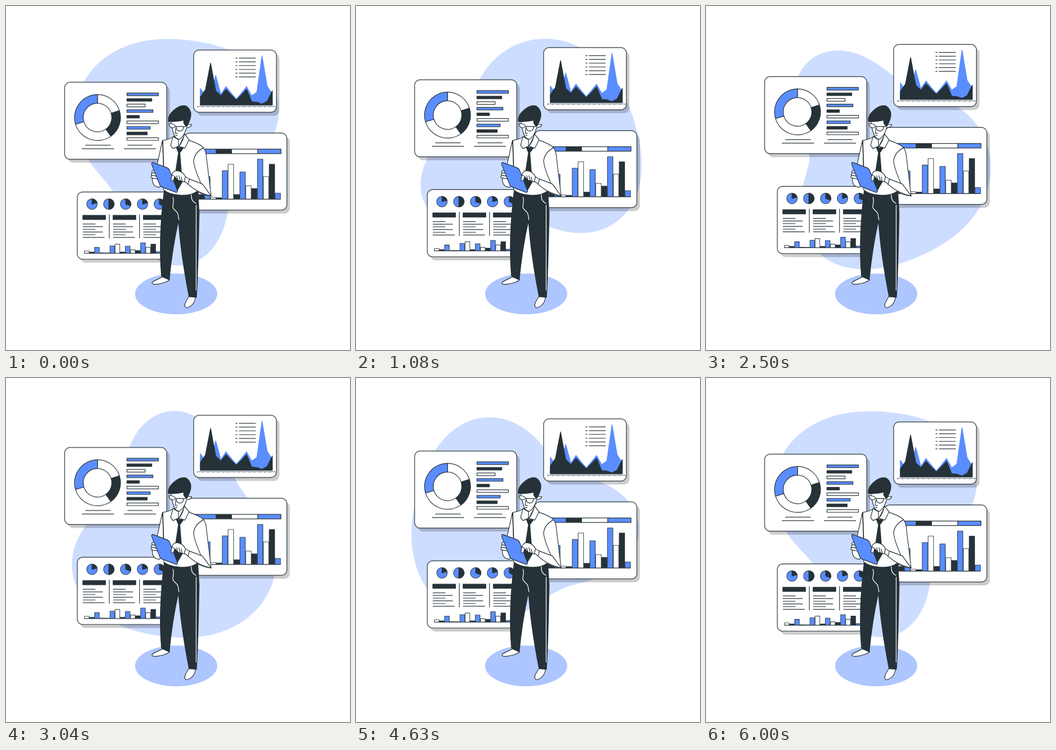
Animation, 748 px wide and 748 px high, one loop 6040 ms. Source, as an HTML page:

```html
<!DOCTYPE html>
<html lang="en">
<head>
<meta charset="utf-8">
<title>Data analysis</title>
<style>
  html, body { margin: 0; width: 100%; height: 100%; overflow: hidden; background: #fff; }
  svg { display: block; width: 100vw; height: 100vh; }
  #blob { fill: #cdddff; transform-origin: 369px 318px; animation: spin 6040ms linear infinite; }
  #cards { animation: float 6040ms linear infinite; }
  @keyframes spin { to { transform: rotate(360deg); } }
  @keyframes float {
    from, to { transform: translateY(.2px); }
    50% { transform: translateY(-14.6px); }
  }
  .ink { stroke: #263238; stroke-width: 1.4; stroke-linejoin: round; stroke-linecap: round; }
  .thin { stroke-width: 1.1; }
  .blue { fill: #5a8dff; }
  .dark { fill: #263238; }
  .white { fill: #fff; }
  .line { fill: none; }
  .chalk { fill: none; stroke: #fff; stroke-width: 1.5; }
  .shadow { opacity: .2; }
</style>
</head>
<body>
<svg viewBox="0 0 748 748">
  <path id="blob"/>
  <ellipse cx="370" cy="626" rx="89.3" ry="44.3" fill="#adc6ff"/>
  <g id="cards"></g>

  <g class="ink">
    <!-- shoes and trousers -->
    <path class="white" d="M340 589L356 595Q348 603 324 605.5C315 604 316 601 322 598Z"/>
    <path class="white" d="M398 631L412 633Q410 651 394 656C387 656 388 649 391 643Z"/>
    <path class="dark" d="M344 401Q331 505 338 587L355 595.5Q361 530 375 467Q380 540 398 632L414 633.5Q417 600 420 450L417 403Z"/>
    <path class="chalk" d="M363 416C367 428 361 432 363 438S373 447 374 453L376 465M403 410Q402 424 413 429M413.5 433V618"/>

    <!-- shirt, collar and tie -->
    <path class="white" d="M340 293L329 343L318 377Q319 394 334 394L345 380Z"/>
    <path class="white" d="M341 292Q354 291 364 284L386 279L398 292C430 303 434 308 436 330L446 413Q430 412 415 403C397 417 358 412 343 400Z"/>
    <path class="line" d="M341 293L343 351M430 308Q410 318 408 337Q409 352 424 386"/>
    <path class="white" d="M366 282L375 307L389 279Z"/>
    <path class="dark" d="M369 304L376 308L386 308L378 319L383 383L372 402L364 392L375 319Z"/>
    <path class="white" d="M363 284L358 303L363 310L375 305V291ZM388 278L398 291L389 309L376 305Q385 295 388 278Z"/>

    <!-- head -->
    <path class="white" d="M359 246Q358 257 364 276Q367 289 377 290Q388 283 393 264Q402 265 404 258Q396 256 393 260V240Z"/>
    <path class="dark" d="M353 251Q351 237 368 224Q380 214 392 217.5Q411 231 394 260L392 262L388 257Q385 254 387 248Q371 252 353 251Z"/>
    <path class="white" d="M354 256Q366 255 369 262Q358 270 354 256ZM370 262H386Q386 272 378 272T370 262Z"/>
    <path class="line" d="M386 263L394 261M369 266L368 277H373M369 282L372 281"/>

    <!-- hands and tablet -->
    <g id="fingers" class="white" transform="rotate(10 318 358)"></g>
    <path class="blue" d="M319 340L351 352Q355 354 356 358L373 402Q373 406 369 405L340 394Q335 392 334 388L317 345Q316 340 319 340Z"/>
    <path class="white" d="M398 376L427 387L446 413Q414 406 391 383L374 379L367 371L364 379Q359 383 359 376L361 367Q363 358 372 358Q385 360 390 371Z"/>
    <path class="line" d="M361 367L367 371M371 369L374 379M376 369L379 380M381 372L383 381M390 371L388 382M399 376L396 387"/>
  </g>
</svg>

<script>
const tones = ['white', 'dark', 'blue'];
const repeat = (n, draw) => Array.from({ length: n }, (_, i) => draw(i)).join('');

const box = (x, y, w, h, tone, extra = '') =>
  `<rect class="ink ${tone}" x="${x}" y="${y}" width="${w}" height="${h}" ${extra}/>`;
const path = (d, tone) => `<path class="ink ${tone}" d="${d}"/>`;
const line = (x1, x2, y) => path(`M${x1} ${y}H${x2}`, 'line');
const card = (x, y, w, h) =>
  box(x + 6.5, y + 7.5, w, h, 'dark shadow', 'rx="12" style="fill:#000;stroke:none"') +
  box(x, y, w, h, 'white', 'rx="12"');

const polar = (cx, cy, r, deg) => {
  const a = deg * Math.PI / 180;
  return [cx + r * Math.cos(a), cy + r * Math.sin(a)];
};

// Pie slice, or a ring slice when an inner radius is given.
function slice(cx, cy, r, from, to, tone, inner = 0) {
  return path(`M${polar(cx, cy, r, from)}A${r} ${r} 0 0 1 ${polar(cx, cy, r, to)}` +
    `L${polar(cx, cy, inner, to)}` +
    `A${inner} ${inner} 0 0 0 ${polar(cx, cy, inner, from)}Z`, tone);
}

// Both column charts show the same data at different scales.
const sales = [19, 10, 49, 4, 3, 62, 76, 10, 59, 29, 23, 87, 49, 76, 13];
const columns = (x, base, pitch, scale) =>
  sales.map((v, i) => box(x + i * pitch, base - v * scale, pitch - .9, v * scale, tones[i % 3] + ' thin')).join('') +
  line(x, x + pitch * sales.length - 1, base);

// Peaks are heights at even steps above the base line.
function area(peaks, tone) {
  const pts = peaks.map((h, i) => `${422.5 + i * 11.18},${215 - h}`);
  const color = tone === 'blue' ? '#5a8dff' : '#263238';
  return `<polygon class="${tone}" points="422.5,215 ${pts.join(' ')} 579,215" stroke="${color}" stroke-width="1.5" stroke-linejoin="round"/>`;
}

function ringCard() {
  let from = -90;
  const ring = [72.5, 72, 108.5, 107].map((span, i) =>
    slice(199, 242.3, 50, from, from += span, tones[i % 2 + (i === 3)], 31)).join('');
  const bars = [68.5, 54, 39.5, 56.5, 27, 68.5, 50.5, 44, 68.5].map((w, i) =>
    box(263, 189 + i * 12.15, w, 5.7, tones[(11 - i) % 3])).join('');
  const captions = repeat(2, i => line(173 + i * 91.5, 227 + i * 91, 302.5) + line(165.5 + i * 91.5, 234.5 + i * 91, 310.3));
  return card(127.5, 165.5, 222, 167.5) + ring + bars + captions;
}

function areaCard() {
  const legend = repeat(6, i => line(499.5, 503, 113 + i * 8.2) + line(507, 542.5, 113 + i * 8.2));
  return card(408, 95.5, 180, 135.3) +
    area([36, 20, 22, 64, 23, 40, 26, 13, 26, 40, 20, 28, 107, 41, 24], 'blue') +
    area([17, 33, 91, 31, 20, 34, 22, 11, 22, 34, 7, 6, 2, 8, 31], 'dark') + legend +
    '<path class="ink line" d="M416.5 218H585.5" style="stroke-width:.9"/>' +
    '<path d="M416 219.3H586" stroke="#263238" stroke-width="2.2" stroke-dasharray=".9 10.35"/>';
}

function barCard() {
  let x = 400;
  const strip = [57, 33.5, 57, 50.5].map((w, i) =>
    box((x += w) - w, 311, w, 9.7, tones[(5 - i) % 3])).join('');
  return card(388, 276, 222.7, 167.5) + strip + columns(406.4, 419.8, 12.76, 1);
}

function reportCard() {
  const pies = [75, 180, 110, 75, 115].map((span, i) => {
    const x = 187 + i * 36.6;
    return `<circle class="ink blue thin" cx="${x}" cy="430.5" r="11.4"/>` +
      slice(x, 430.5, 11.4, -90, span - 90, 'dark');
  }).join('');
  const text = repeat(3, c => {
    const x = 167 + c * 65.8;
    return box(x, 455, 49.5, 9, 'dark') +
      repeat(6, i => line(x + .5, x + (i % 2 ? 43 : 27) + (i === 5) * 4, 473.7 + i * 5.85)) +
      (c ? path(`M${x - 8.2} 453.5V504.5`, 'line') : '');
  });
  return card(155, 404.2, 199, 146.2) + pies + text + columns(170.5, 537.5, 11.12, .262);
}

document.getElementById('cards').innerHTML = ringCard() + areaCard() + barCard() + reportCard();
document.getElementById('fingers').innerHTML = repeat(3, i => box(317.5, 357 + i * 5.6, 18, 5.6, 'white', 'rx="2.8"'));

// A circle bent by four harmonics.
const { sin, cos, PI } = Math;
const radius = a => 216 - 32 * sin(a) - 3 * cos(a) - 25.5 * cos(2 * a) - 2 * sin(2 * a)
  - 32 * sin(3 * a) - 2 * cos(3 * a) + 4.5 * (cos(4 * a) - sin(4 * a));
const outline = Array.from({ length: 180 }, (_, i) => polar(369, 318, radius(i * PI / 90), i * 2));
document.getElementById('blob').setAttribute('d', `M${outline.join('L')}Z`);
</script>
</body>
</html>
```
